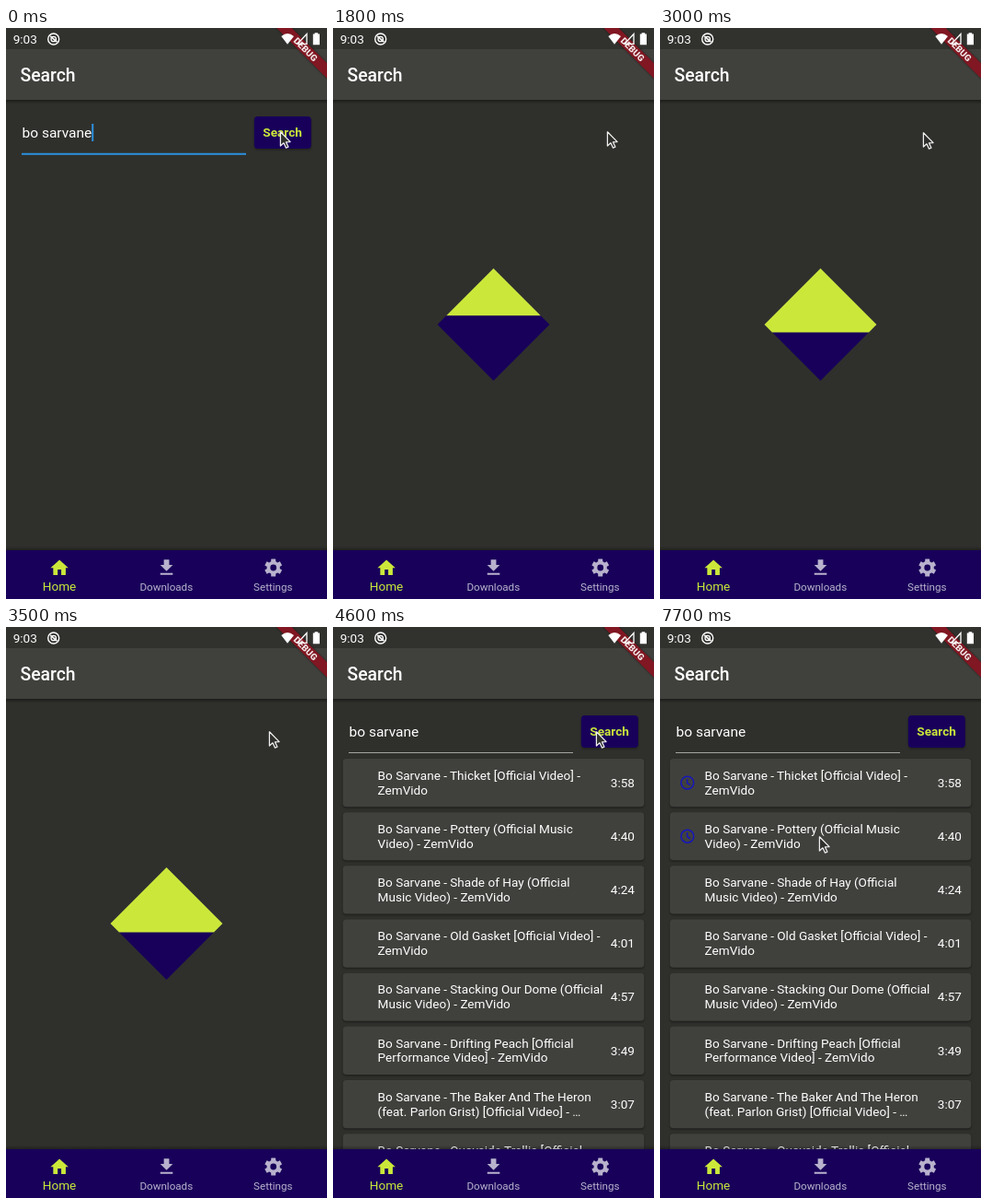
Animation of 349 by 620 pixels, one loop 8 s. Source, as an HTML page:

```html
<!DOCTYPE html>
<html lang="en">
<head>
<meta charset="utf-8">
<title>Search</title>
<style>
  html, body { margin: 0; width: 100%; height: 100%; overflow: hidden; background: #2f302c; }
  svg { display: block; width: 349px; height: 620px; font-family: Roboto, "Noto Sans", sans-serif; }
  text { white-space: pre; }
</style>
</head>
<body>
<svg id="stage" viewBox="0 0 349 620" xmlns="http://www.w3.org/2000/svg">
  <defs>
    <linearGradient id="fall" x2="0" y2="1">
      <stop offset="0" stop-color="#000" stop-opacity=".4"/>
      <stop offset="1" stop-color="#000" stop-opacity="0"/>
    </linearGradient>
    <linearGradient id="rise" x2="0" y2="1">
      <stop offset="0" stop-color="#000" stop-opacity="0"/>
      <stop offset="1" stop-color="#000" stop-opacity=".3"/>
    </linearGradient>
    <filter id="soft" x="-10%" y="-30%" width="120%" height="170%"><feGaussianBlur stdDeviation="1.2"/></filter>
  </defs>
  <rect width="349" height="620" fill="#2f302c"/>

  <g id="form">
    <rect id="line" x="17" width="244"/>
    <rect id="caret" x="93.2" y="104" width="2" height="19" fill="#2c90dd"/>
    <rect x="270" y="97.5" width="62" height="35" rx="4" fill="#000" opacity=".3" filter="url(#soft)"/>
    <rect x="269.8" y="96" width="62" height="35" rx="4" fill="#18005a"/>
    <rect id="press" x="269.8" y="96" width="62" height="35" rx="4" fill="#cbe83a" opacity=".12"/>
  </g>
  <g id="list"></g>
  <g id="loader">
    <path d="M174.5 261 L235.5 322 L174.5 383 L113.5 322Z" fill="#18005a"/>
    <path id="fill" fill="#cbe83a"/>
  </g>

  <rect width="349" height="78" fill="#40413d"/>
  <rect width="349" height="23" fill="#31322e"/>
  <rect y="78" width="349" height="4.5" fill="url(#fall)"/>
  <g transform="translate(349 0) rotate(45)">
    <rect x="-44" y="27.1" width="88" height="11.6" fill="#000" opacity=".5" filter="url(#soft)"/>
    <rect x="-44" y="27.1" width="88" height="11.6" fill="#801722"/>
    <text y="36.4" font-size="9.9" font-weight="900" fill="#f2e6e6" text-anchor="middle">DEBUG</text>
  </g>
  <g fill="#fff">
    <path d="M306 17.8 L299.3 9 Q306 2.8 313 9Z"/>
    <path d="M327 6.5 V17.4 H317Z" fill="none" stroke="#fff" stroke-width="1.3"/>
    <path d="M335.6 5.2 h3.6 v1.3 h1.8 v11.7 h-7.2 v-11.7 h1.8Z"/>
    <g fill="none" stroke="#fff">
      <circle cx="51.7" cy="12" r="6" stroke-width="1.4"/>
      <circle cx="51.7" cy="12" r="2.7" stroke-width="1.3"/>
      <path d="M48.2 8.8 L55.4 15.2" stroke-width="1.6"/>
    </g>
  </g>

  <rect y="563" width="349" height="4" fill="url(#rise)"/>
  <rect y="567" width="349" height="53" fill="#18005a"/>
  <path d="M10 20v-6h4v6h5v-8h3L12 3 2 12h3v8z" transform="translate(46.5 574.5) scale(.969)" fill="#cbe83a"/>
  <g fill="#b9b2cd">
    <path d="M19 9h-4V3H9v6H5l7 7 7-7zM5 18v2h14v-2H5z" transform="translate(162.9 574.3) scale(.969)"/>
    <g id="gear" transform="translate(290.7 586)"><circle r="7.2"/></g>
  </g>
  <g id="labels"></g>
  <path id="cursor" d="M.4 .8 V16 L4 12.8 L6.5 18.2 L8.9 17.1 L6.5 11.9 L11.1 11.6Z"
        fill="#2f302c" stroke="#f0f0f0" stroke-width="1.25" stroke-linejoin="round"/>
</svg>
<script>
const LOOP = 8000, DP = 349 / 360, LIME = '#cbe83a';
const $ = id => document.getElementById(id);

function add(parent, tag, attrs) {
  const el = document.createElementNS('http://www.w3.org/2000/svg', tag);
  for (const k in attrs) el.setAttribute(k, attrs[k]);
  return parent.appendChild(el);
}

// Text centred vertically on cy; size in dp
function label(parent, str, x, cy, size, attrs) {
  const px = size * DP;
  add(parent, 'text', { x, y: cy + px * .341, 'font-size': px, fill: '#fff', ...attrs }).textContent = str;
}

const middle = { 'text-anchor': 'middle' };
const ARTIST = 'Bo Sarvane', SITE = 'ZemVido';
const rows = [
  ['Thicket [Official Video] -', SITE, '3:58'],
  ['Pottery (Official Music', 'Video) - ' + SITE, '4:40'],
  ['Shade of Hay (Official', 'Music Video) - ' + SITE, '4:24'],
  ['Old Gasket [Official Video] -', SITE, '4:01'],
  ['Stacking Our Dome (Official', 'Music Video) - ' + SITE, '4:57'],
  ['Drifting Peach [Official', 'Performance Video] - ' + SITE, '3:49'],
  ['The Baker And The Heron', '(feat. Parlon Grist) [Official Video] - \u2026', '3:07'],
  ['Quayside Trellis [Official', 'Video] - ' + SITE, '3:21']
];

label($('form'), ARTIST.toLowerCase(), 17.5, 113.5, 16);
label($('form'), 'Search', 300.6, 113.5, 14, { ...middle, fill: LIME, 'font-weight': 700 });

const clocks = rows.map(([first, second, time], i) => {
  const y = 143 + i * 60 * DP, mid = y + 26.1, list = $('list');
  const card = { x: 10.7, width: 327.6, height: 52.2, rx: 4 };
  add(list, 'rect', { ...card, y: y + 1.2, fill: '#000', opacity: .4, filter: 'url(#soft)' });
  add(list, 'rect', { ...card, y, fill: '#40413d' });
  label(list, `${ARTIST} - ${first}`, 48.6, mid - 7.9, 14);
  label(list, second, 48.6, mid + 7.9, 14);
  label(list, time, 328, mid, 14, { 'text-anchor': 'end' });
  const g = add(list, 'g', { fill: 'none', stroke: '#1616bb', 'stroke-width': 1.5, transform: `translate(29.8 ${mid})` });
  add(g, 'circle', { r: 6.9 });
  add(g, 'path', { d: 'M-.2 -4.2 V.5 L3.2 2.5' });
  return g;
});

for (const a of [0, 60, 120])
  add($('gear'), 'rect', { x: -2.5, y: -9.5, width: 5, height: 19, rx: .6, transform: `rotate(${a})` });
add($('gear'), 'circle', { r: 3.4, fill: '#18005a' });

const labels = $('labels');
label(labels, '9:03', 7.7, 12.3, 14);
label(labels, 'Search', 15.5, 51.4, 20, { 'font-weight': 500 });
label(labels, 'Home', 58, 606, 14, { ...middle, fill: LIME });
label(labels, 'Downloads', 174.3, 607, 12, { ...middle, fill: '#b9b2cd' });
label(labels, 'Settings', 290.3, 607, 12, { ...middle, fill: '#b9b2cd' });

// Pointer steps: time, x, y
const pointer = [
  [0, 298, 112], [1900, 294, 117], [2000, 290, 122], [2100, 287, 126],
  [2700, 287, 120], [2800, 286, 113], [5200, 254, 137], [5400, 240, 146],
  [5500, 217, 161], [5600, 198, 171], [5700, 197, 171], [5800, 196, 171],
  [6700, 190, 185], [6800, 179, 213], [6900, 173, 227]
];

// Loader phase in radians: time, angle
const phase = [
  [1300, -1.29], [1800, 1.41], [2500, 5.146], [3500, 10.839],
  [3900, 12.96], [4100, 14.07], [4200, 14.07], [4300, 14.25], [4600, 14.25]
];

function lerp(keys, t) {
  const i = Math.max(1, keys.findIndex(k => k[0] >= t));
  const [t0, a] = keys[i - 1], [t1, b] = keys[i];
  return a + (b - a) * (t - t0) / (t1 - t0);
}

const show = (el, on) => el.setAttribute('visibility', on ? 'visible' : 'hidden');

function render(t) {
  const busy = t >= 1300 && t < 4600, done = t >= 4600;
  $('form').style.display = busy ? 'none' : '';
  $('list').style.display = done ? '' : 'none';
  $('loader').style.display = busy ? '' : 'none';

  show($('caret'), t < 200);
  show($('press'), t >= 800 && t < 1300);
  $('line').setAttribute('y', done ? 136 : 135.8);
  $('line').setAttribute('height', done ? 1 : 2);
  $('line').setAttribute('fill', done ? '#a3a3a0' : '#2c90dd');
  clocks.forEach((c, i) => show(c, i === 0 && t >= 6200 || i === 1 && t >= 7700));

  if (busy) {
    const h = 61 * (1 - Math.cos(lerp(phase, t)));
    const y = 261 + h, w = Math.min(h, 122 - h), waist = Math.min(h, 61);
    $('fill').setAttribute('d',
      `M174.5 261 L${174.5 + waist} ${261 + waist} L${174.5 + w} ${y} H${174.5 - w} L${174.5 - waist} ${261 + waist}Z`);
  }

  const [, x, y] = pointer.filter(p => p[0] <= t).pop();
  $('cursor').setAttribute('transform', `translate(${x} ${y})`);
}

const start = performance.now();
function tick() {
  const t = (performance.now() - start) % LOOP;
  render(Math.floor(t / 100) * 100);
  requestAnimationFrame(tick);
}
tick();
</script>
</body>
</html>
```
